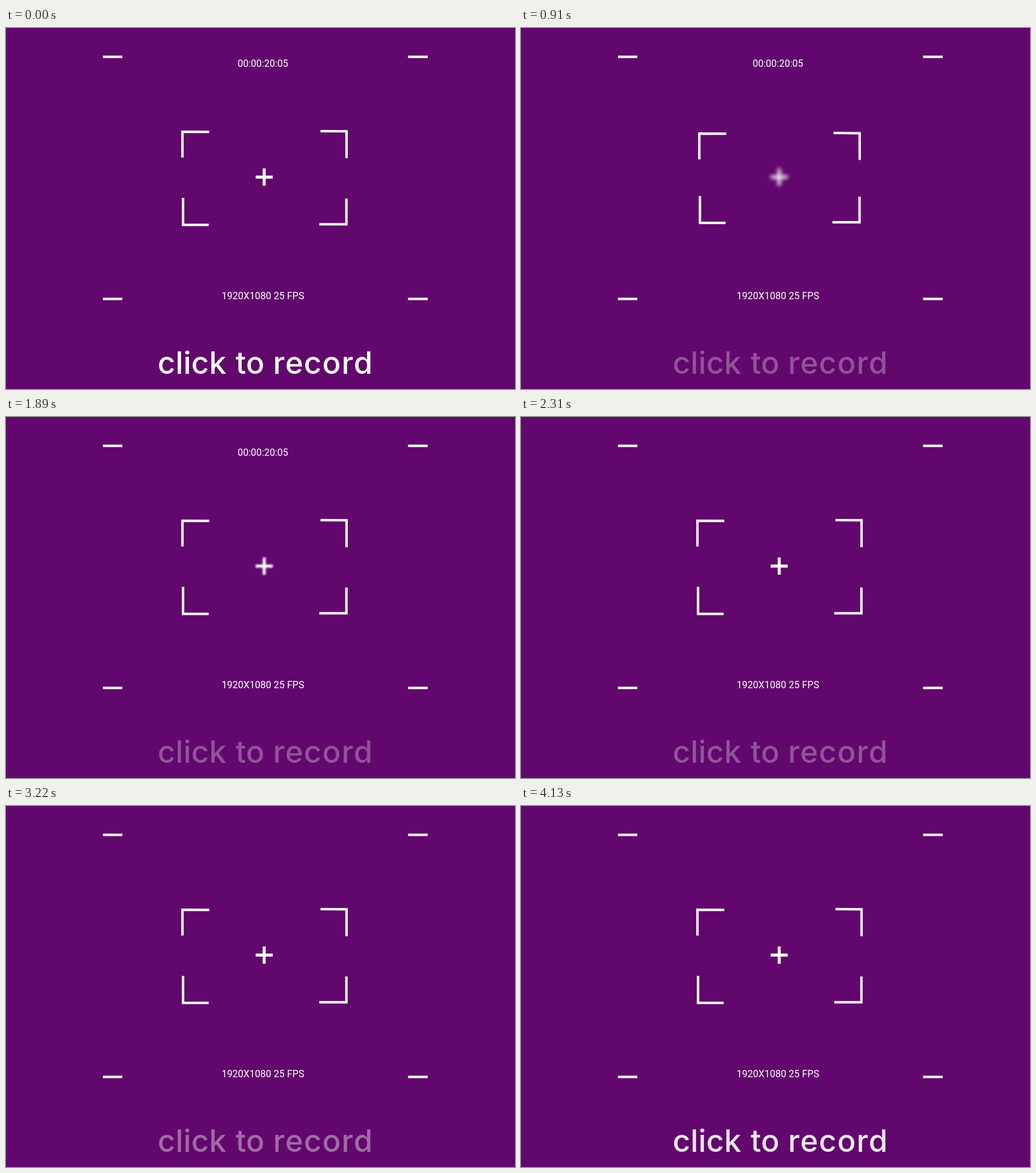
Animation, 840 px wide and 595 px high, one loop 4200 ms. Source, as an HTML page:

```html
<!DOCTYPE html>
<html lang="en">
<head>
<meta charset="utf-8">
<title>Click to record</title>
<style>
  html, body { margin: 0; width: 100%; height: 100%; overflow: hidden; background: #62076d; }
  svg { display: block; width: 840px; height: 595px; }
  .lines { fill: none; stroke: #fff; stroke-width: 4; }
  #cross { stroke-width: 4.9; }
  text { fill: #fff; text-anchor: middle; }
  .info { font: 400 16px Roboto, sans-serif; }
  .prompt { font: 500 50.5px Inter, sans-serif; letter-spacing: .3px; }
  .wide { letter-spacing: 1.3px; }
</style>
</head>
<body>
<svg viewBox="0 0 840 595">
  <defs>
    <filter id="soft" filterUnits="userSpaceOnUse" x="390" y="210" width="72" height="72" color-interpolation-filters="sRGB">
      <feGaussianBlur id="blur" stdDeviation="0"/>
    </filter>
  </defs>
  <path class="lines" d="M160 47.5H192M663.5 47.5H696M160 446.5H192M663.5 446.5H696"/>
  <g class="lines">
    <path class="corner" data-dir="1 1" d="M335.5 171.2L291.2 171V213.5"/>
    <path class="corner" data-dir="-1 1" d="M519 170L562 170.3V214.5"/>
    <path class="corner" data-dir="1 -1" d="M292.2 280V324.4H334.5"/>
    <path class="corner" data-dir="-1 -1" d="M517 323.4H561.8V281"/>
  </g>
  <path id="cross" class="lines" d="M412 245.7H440.2M426.1 231.5V260"/>
  <text id="clock" class="info" x="424" y="64">00:00:20:05</text>
  <text class="info" x="424" y="447">1920X1080 25 FPS</text>
  <g id="prompt" class="prompt">
    <text x="307" y="569.5">click</text>
    <text x="403" y="569.5">to</text>
    <text x="523.5" y="569.5" class="wide">record</text>
  </g>
</svg>
<script>
  const LOOP = 4200, STEP = 70;
  const byId = id => document.getElementById(id);
  const clock = byId('clock'), prompt = byId('prompt'), cross = byId('cross'), blur = byId('blur');
  const corners = [...document.querySelectorAll('.corner')].map(el => ({
    el, dir: el.dataset.dir.split(' ').map(Number)
  }));

  // Linear rise to 1 at the middle of the span and back to 0.
  const pulse = (t, span) => Math.max(0, 1 - Math.abs(2 * t / span - 1));

  const blink = { first: 385, half: 467, last: 3187 };
  const clockOn = t => t < blink.first ||
    (t < blink.last && Math.floor((t - blink.first) / blink.half) % 2 === 1);

  function draw(now) {
    const t = Math.floor((now % LOOP) / STEP + 1e-6) * STEP;
    prompt.setAttribute('opacity', 1 - pulse(t % 1400, 1400));
    clock.setAttribute('visibility', clockOn(t) ? 'visible' : 'hidden');

    const shift = 5.6 * pulse(t, 1260);
    for (const { el, dir: [x, y] } of corners)
      el.setAttribute('transform', `translate(${x * shift} ${y * shift})`);

    const radius = 4 * pulse(t, 2450);
    blur.setAttribute('stdDeviation', radius);
    if (radius) cross.setAttribute('filter', 'url(#soft)');
    else cross.removeAttribute('filter');
  }

  const start = performance.now();
  function tick() {
    draw(performance.now() - start);
    requestAnimationFrame(tick);
  }
  tick();
</script>
</body>
</html>
```
